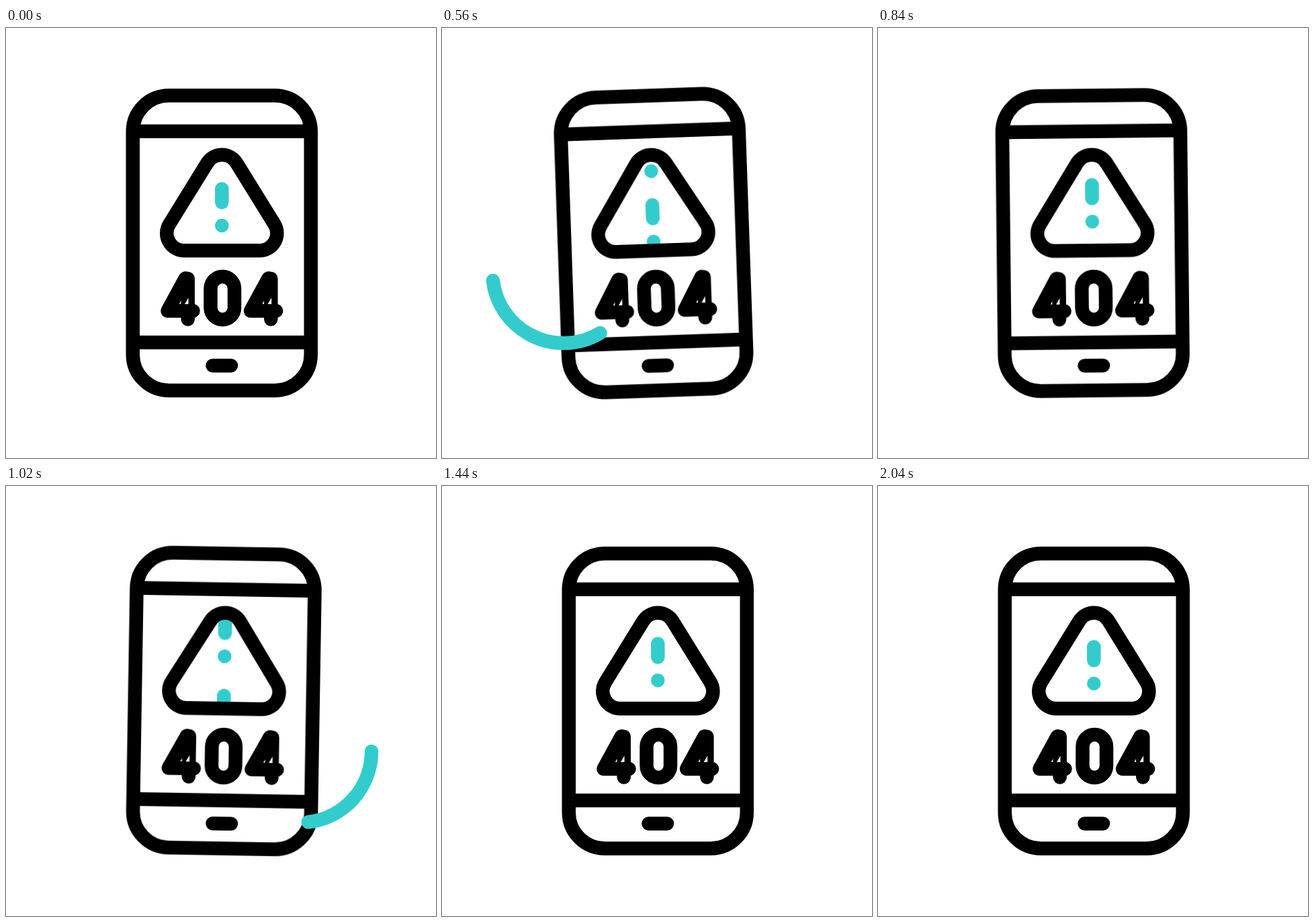
An HTML page for the animation above (2.24 s loop, 640 px wide and 640 px high).

```html
<!DOCTYPE html>
<html lang="en">
<head>
<meta charset="utf-8">
<title>404 phone</title>
<style>
  html, body { margin: 0; width: 100%; height: 100%; overflow: hidden; background: #fff; }
  svg { display: block; width: 100%; height: 100%; }

  .ink, .teal { fill: none; stroke: #000; stroke-width: 20.5; }
  .teal { stroke: #33cccc; }
  .round, .teal { stroke-linecap: round; stroke-linejoin: round; }

  .phone, .marks, .arc { animation: 2240ms linear infinite; }

  .phone { transform-origin: 321.3px 502px; animation-name: shake; }
  @keyframes shake {
    0%, 10.18%, 63.3%, 100% { transform: rotate(0deg); }
    17.77%, 32.95%, 48.13% { transform: rotate(2deg); }
    25.36%, 40.54%, 55.71% { transform: rotate(-2deg); }
  }
  .phone { animation-timing-function: cubic-bezier(.333, 0, .667, 1); }

  /* Each step brings the next exclamation mark into the triangle. */
  .marks { animation-name: scroll; }
  @keyframes scroll {
    0% { transform: translateY(0); }
    10.27% { transform: translateY(0); animation-timing-function: cubic-bezier(.506, 0, .465, 1); }
    33.48% { transform: translateY(-105px); animation-timing-function: cubic-bezier(.345, 0, .76, 1); }
    61.16% { transform: translateY(-218px); animation-timing-function: cubic-bezier(.277, 0, .667, 1); }
    91.07%, 100% { transform: translateY(-333px); }
  }

  /* Arcs draw in from the outer end, then wipe out the same way. */
  .arc { animation-timing-function: cubic-bezier(.333, 0, .667, 1), step-end; opacity: 0; }
  .left { animation-name: wipe-left, show-left; }
  .right { animation-name: wipe-right, show-right; }
  @keyframes wipe-left {
    0%, 10.18% { stroke-dasharray: 0 300; stroke-dashoffset: 0; }
    21.56%, 23.44% { stroke-dasharray: 100 300; stroke-dashoffset: 0; }
    34.82%, 100% { stroke-dasharray: 100 300; stroke-dashoffset: -100; }
  }
  @keyframes show-left {
    0%, 34.6%, 100% { opacity: 0; }
    10.9% { opacity: 1; }
  }
  @keyframes wipe-right {
    0%, 37.95% { stroke-dasharray: 0 300; stroke-dashoffset: 0; }
    49.33% { stroke-dasharray: 100 300; stroke-dashoffset: 0; }
    59.96%, 100% { stroke-dasharray: 100 300; stroke-dashoffset: -100; }
  }
  @keyframes show-right {
    0%, 59.7%, 100% { opacity: 0; }
    38.3% { opacity: 1; }
  }
</style>
</head>
<body>
<svg viewBox="0 0 640 640">
  <defs>
    <path id="triangle" d="M299.4 201A25.75 25.75 0 0 1 343.2 201L399.5 292A25.75 25.75 0 0 1 377.6 331.25H265A25.75 25.75 0 0 1 243.1 292Z"/>
    <clipPath id="inside"><use href="#triangle"/></clipPath>
    <path id="mark" class="teal" d="M321.3 239.5V259.5M321.3 294h.01"/>
    <g id="four">
      <path class="ink round" d="M267 372.5L240.5 421H278.5M270.7 373V433.5"/>
      <path fill="#fff" d="M271.5 401.5V411H266Z"/>
    </g>
  </defs>

  <g class="phone">
    <rect class="ink" x="188.75" y="100.5" width="265" height="439" rx="53.5"/>
    <path class="ink" d="M189 153.75H454M189 468H454"/>
    <path class="ink round" d="M307.5 502.5H335"/>
    <g clip-path="url(#inside)">
      <g class="marks">
        <use href="#mark"/>
        <use href="#mark" y="105"/>
        <use href="#mark" y="218"/>
        <use href="#mark" y="333"/>
      </g>
    </g>
    <use href="#triangle" class="ink"/>
    <use href="#four"/>
    <rect class="ink" x="304.5" y="370" width="35.5" height="64" rx="17.75"/>
    <use href="#four" x="123.6"/>
  </g>

  <path class="teal arc left" pathLength="100" d="M75 364A106 106 0 0 0 235.5 454"/>
  <path class="teal arc right" pathLength="100" d="M544 395A106 106 0 0 1 398 493"/>
</svg>
</body>
</html>
```
